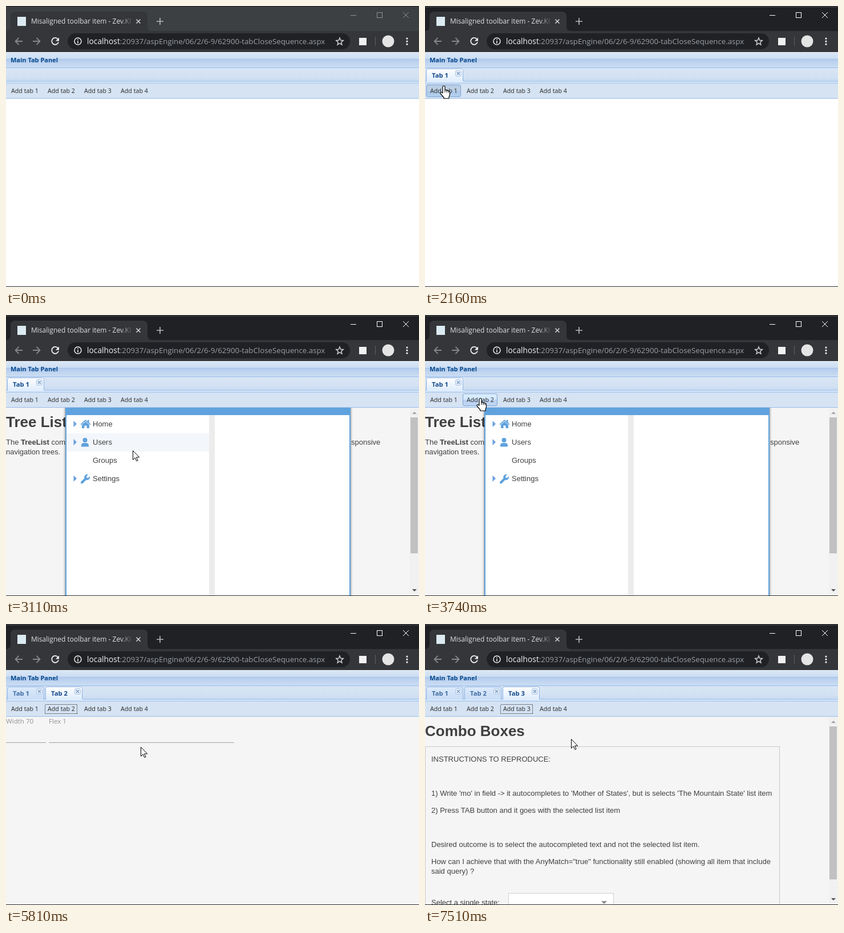
An HTML page for the animation above (8 s loop, 724x494 px).

```html
<!DOCTYPE html>
<html lang="en">
<head>
<meta charset="utf-8">
<title>Tab panel</title>
<style>
  html, body { margin: 0; width: 100%; height: 100%; overflow: hidden; background: #fff; }
  #stage { display: block; width: 724px; height: 494px; }
  rect { shape-rendering: crispEdges; }
  .smooth { shape-rendering: auto; }
  .line { fill: none; stroke-width: 1; }
  .chrome { font-family: "Open Sans", sans-serif; }
  .ui { font: 10.65px "Noto Sans", sans-serif; fill: #333; }
  .bold { font: bold 11px "Noto Sans", sans-serif; }
  .page { font: 13px "Liberation Sans", sans-serif; fill: #404040; }
  .h1 { font-size: 26px; font-weight: bold; }
  .field { font: 11.6px "Open Sans", sans-serif; fill: #929292; }
</style>
</head>
<body>
<svg id="stage" viewBox="0 0 724 494">
  <defs>
    <linearGradient id="header" x2="0" y2="1">
      <stop stop-color="#dae7f6"/><stop offset=".42" stop-color="#cddef3"/>
      <stop offset=".46" stop-color="#abc7ec"/><stop offset=".54" stop-color="#b8cfee"/>
      <stop offset="1" stop-color="#cbddf3"/>
    </linearGradient>
    <linearGradient id="bar" x2="0" y2="1"><stop stop-color="#d8e5f4"/><stop offset=".7" stop-color="#d2e1f3"/><stop offset="1" stop-color="#c5d8ef"/></linearGradient>
    <linearGradient id="hover" x2="0" y2="1">
      <stop stop-color="#dbeeff"/><stop offset=".48" stop-color="#d0e7ff"/>
      <stop offset=".52" stop-color="#bbd2f0"/><stop offset="1" stop-color="#bed6f5"/>
    </linearGradient>
    <linearGradient id="pressed" x2="0" y2="1"><stop stop-color="#b6cbe4"/><stop offset=".48" stop-color="#bfd2e6"/><stop offset=".52" stop-color="#acc9ea"/><stop offset="1" stop-color="#b2cfef"/></linearGradient>
    <linearGradient id="tabOn" x2="0" y2="1"><stop stop-color="#fff"/><stop offset=".35" stop-color="#f3f8fe"/><stop offset="1" stop-color="#deecfd"/></linearGradient>
    <linearGradient id="tabOff" x2="0" y2="1"><stop stop-color="#dceafa"/><stop offset="1" stop-color="#c9ddf6"/></linearGradient>
    <linearGradient id="fade"><stop stop-color="#35363a" stop-opacity="0"/><stop offset="1" stop-color="#35363a"/></linearGradient>
    <filter id="shadow" x="-5%" width="110%"><feDropShadow dx="0" dy="0" stdDeviation="2" flood-opacity=".55"/></filter>
  </defs>

  <!-- browser window -->
  <g class="chrome">
    <rect id="strip" width="724" height="45"/>
    <rect width="724" height="1" fill="#161617"/>
    <rect id="topEdge" y="1" width="724" height="1"/>
    <path d="M0 44q8 0 8-8V18q0-8 8-8H240q8 0 8 8V36q0 8 8 8z" fill="#35363a"/>
    <rect y="44" width="724" height="37" fill="#35363a"/>
    <rect x="20" y="19" width="15" height="16" fill="#dcebf2"/>
    <svg x="44" width="175" height="44"><text y="31" font-size="12" fill="#dfe0e2">Misaligned toolbar item - Zev.KIT</text></svg>
    <rect x="200" y="14" width="24" height="26" fill="url(#fade)"/>
    <path d="M228.5 23.500l7 7m0-7l-7 7" stroke="#d5d6d8" stroke-width="1.5"/>
    <path d="M264 27h12M270 21v12" stroke="#b4b6b9" stroke-width="1.7"/>
    <g id="winButtons" class="line"><path d="M604 16.500h10M696 11l10 10m0-10l-10 10"/><rect x="650.500" y="11.500" width="9" height="9"/></g>
    <g fill="none" stroke="#85878a" stroke-width="1.8">
      <path d="M29 62H16.500m6-6l-6 6 6 6M47 62h12.500m-6-6l6 6-6 6"/>
      <path d="M91 58.200A6 6 0 1 0 92 63.500" stroke="#f1f1f1"/>
    </g>
    <path d="M93 55.500v6h-6z" fill="#f1f1f1"/>
    <rect class="smooth" x="108" y="48" width="495" height="28" rx="14" fill="#202124"/>
    <circle cx="126" cy="62" r="6" fill="none" stroke="#eee" stroke-width="1.5"/>
    <path d="M126 58.200v1.600m0 1.500v4.500" stroke="#eee" stroke-width="1.600"/>
    <text x="142" y="67" font-size="13.800" fill="#f2f2f3">localhost<tspan font-size="13.260" fill="#9aa0a6">:20937/aspEngine/06/2/6-9/62900-tabCloseSequence.aspx</tspan></text>
    <path d="M585 56l1.700 4.300 4.600.3-3.500 3 1.100 4.500-3.900-2.500-3.900 2.500 1.100-4.500-3.500-3 4.600-.3z" fill="none" stroke="#d0d2d5" stroke-width="1.400"/>
    <rect x="619" y="56" width="13" height="13" fill="#f1f1f1"/>
    <rect x="647" y="54" width="1" height="16" fill="#5f6063"/>
    <circle cx="670" cy="62" r="10.500" fill="#e4e4e4"/>
    <path d="M703 57.200h.01M703 62.200h.01M703 67.200h.01" stroke="#eee" stroke-width="3.200" stroke-linecap="round"/>
  </g>

  <!-- panel header, tab bar, toolbar -->
  <rect y="81" width="724" height="27" fill="url(#header)"/>
  <rect y="81" width="724" height="1" fill="#f0f5fb"/>
  <text class="bold" x="8" y="99" fill="#04468c">Main Tab Panel</text>
  <rect y="108" width="724" height="25" fill="url(#bar)"/>
  <rect y="108" width="724" height="1" fill="#99bce8"/>
  <rect y="132" width="724" height="4" fill="#99bce8"/>
  <rect y="133" width="724" height="2" fill="#deecfd"/>
  <rect y="136" width="724" height="26" fill="#d5e3f3"/>
  <rect y="162" width="724" height="1" fill="#99bce8"/>
  <g id="tabs"></g>
  <g id="buttons"></g>

  <!-- page bodies -->
  <svg y="163" width="724" height="330" viewBox="0 163 724 330">
    <g class="body page">
      <rect y="163" width="724" height="330" fill="#f5f5f5"/>
      <text class="h1" y="197">Tree List</text>
      <text y="228">The <tspan font-weight="bold">TreeList</tspan> component</text>
      <text x="605" y="228">sponsive</text><text y="245">navigation trees.</text>
      <rect x="104" y="150" width="500" height="380" fill="#5fa2dd" filter="url(#shadow)"/>
      <rect x="106" y="176" width="496" height="330" fill="#fff"/>
      <rect x="356" y="176" width="10" height="330" fill="#ececec"/>
      <rect id="rowHover" x="106" width="250" height="32" fill="#f3f6fa"/>
      <g id="rows"></g>
      <g fill="#5fa2dd">
        <path d="M130.500 192l9-8 3.500 3v-2.500h2.500v4.700l3 2.800-1.200 1.300-7.800-7-7.800 7zM133 193l6.500-5.700 6.500 5.700v6h-4.500v-4.500h-4v4.500H133z"/>
        <circle cx="138.500" cy="220" r="4"/><path d="M132 231.500v-2q0-4.500 4.500-4.500h4q4.500 0 4.500 4.500v2z"/>
        <path d="M131.500 293l6-6q-1-4 2-6 2.500-1.600 4.500-.5l-3 3 .5 2.500 2.500.5 3-3q1 3-1 5-2.500 2.500-5.500 1.500l-6 6q-1.500 1-3 0-1.200-1.500 0-3z"/>
      </g>
    </g>
    <g class="body field">
      <rect y="163" width="724" height="330" fill="#f5f5f5"/>
      <text y="175">Width 70</text><text x="75" y="175">Flex 1</text>
      <rect y="208" width="70" height="1" fill="#a0a0a0"/><rect x="75" y="208" width="325" height="1" fill="#a0a0a0"/>
    </g>
    <g class="body page">
      <rect y="163" width="724" height="330" fill="#f5f5f5"/>
      <text class="h1" y="197">Combo Boxes</text>
      <rect class="line" x=".5" y="215.500" width="621" height="300" stroke="#c8c8c8"/>
      <g id="instructions"></g>
      <rect x="146.500" y="473.500" width="184" height="30" fill="#fff" stroke="#cfcfcf"/>
      <path d="M309 487h10l-5 5.500z" fill="#919191"/>
    </g>
    <g id="scrollbar">
      <rect x="708" y="163" width="16" height="330" fill="#f1f1f1"/>
      <rect id="thumb" x="709" y="180" width="13" fill="#c1c1c1"/>
      <path d="M712 174h8l-4-4z" fill="#a3a3a3"/><path d="M712 482h8l-4 4z" fill="#505050"/>
    </g>
    <g id="mask">
      <rect y="163" width="724" height="330" fill="#e4e4e4"/>
      <rect x="321.500" y="312.500" width="80" height="30" fill="#dfe9f6" stroke="#99bce8"/>
      <rect x="324.500" y="315.500" width="74" height="24" fill="#eee" stroke="#99bce8"/>
      <g id="spinner"></g>
      <text class="ui" x="350" y="332" style="font-size:10.200px;fill:#222">Loading</text>
    </g>
  </svg>
  <rect y="493" width="724" height="1" fill="#2b2c30"/>

  <g id="pointer" stroke="#000" fill="#fff" stroke-linejoin="round">
    <path id="arrow" d="M.5.500v16l3.700-3.500 2.600 5.700 2.300-1-2.600-5.600h5.200z"/>
    <g id="hand" transform="translate(-6 -1)">
      <path stroke-width="1.200" d="M5 13V2.500a2 2 0 0 1 4 0V8a2 2 0 0 1 3.200.7 2 2 0 0 1 3 .8 1.900 1.900 0 0 1 2.300 1.900V15c0 2.200-1.500 3.500-1.500 5.500v2H7V21l-5.800-7c-1-1.600.6-3.200 2.200-2.100z"/>
      <path fill="none" d="M9 8v4M12.200 9v3M15.200 10v2.500"/>
    </g>
  </g>
</svg>
<script>
const LOOP = 8000;
const $ = id => document.getElementById(id);
const repeat = (n, make) => Array.from({ length: n }, (_, i) => make(i)).join('');
const show = (el, on) => el.setAttribute('display', on ? 'inline' : 'none');
const set = (el, attrs) => { for (const k in attrs) el.setAttribute(k, attrs[k]); };

// Each click: button goes down, tab appears, mask covers it, content is ready.
const openings = [
  { press: 2030, release: 2590, tab: 2110, mask: 2200, load: 2480 },
  { press: 4380, release: 4510, tab: 4510, mask: 4650, load: 4960 },
  { press: 6830, release: 6910, tab: 6910, mask: 7030, load: 7350 }
];

// Pointer moves: start, end, destination.
const start = [696, 490];
const moves = [
  [270, 1050, 96, 212], [1290, 1570, 33, 142], [2000, 2030, 32, 141],
  [2560, 2790, 195, 240], [2800, 2880, 240, 257], [3080, 3500, 112, 124],
  [3500, 3740, 96, 147], [4380, 4510, 96, 150], [4820, 5080, 253, 231],
  [5780, 6100, 160, 148], [7270, 7510, 256, 202]
];

$('buttons').innerHTML = repeat(4, i => `<g transform="translate(${2 + 64 * i} 138)">
  <rect class="smooth face" x=".5" y=".5" width="60" height="21" rx="2.500" stroke="#81a4d0"/>
  <rect class="line focus" x="2.500" y="3.500" width="56" height="16" stroke="#222" stroke-dasharray="1 1"/>
  <text class="ui" x="7" y="15">Add tab ${i + 1}</text></g>`);

$('tabs').innerHTML = repeat(3, i => `<g transform="translate(${2 + 67 * i} 110)">
  <path class="shape" d="M.5 23V3.500q0-3 3-3h58q3 0 3 3V23" stroke="#8db2e3"/>
  <rect class="foot" x="1" y="22" width="64" height="1" fill="#deecfd"/>
  <text class="bold" x="10" y="16" style="font-size:11.300px">Tab ${i + 1}</text>
  <rect class="smooth" x="51.500" y="3.500" width="10" height="10" rx="2" fill="#e4eefa" stroke="#a9c3e3"/>
  <path d="M54 6l5 5m0-5l-5 5" stroke="#7f9fc6" stroke-width="1.500"/></g>`);

$('rows').innerHTML = ['Home', 'Users', 'Groups', 'Settings'].map((label, i) => {
  const y = 196 + 32 * i;
  const expander = label === 'Groups' ? '' : `<path d="M118.500 ${y - 10}l5.500 5.500-5.500 5.500z" fill="#6b9fe0"/>`;
  return `${expander}<text x="152" y="${y}">${label}</text>`;
}).join('');

$('instructions').innerHTML = [
  [242, 'INSTRUCTIONS TO REPRODUCE:'],
  [302, "1) Write 'mo' in field -&gt; it autocompletes to 'Mother of States', but is selects 'The Mountain State' list item"],
  [332, '2) Press TAB button and it goes with the selected list item'],
  [392, 'Desired outcome is to select the autocompleted text and not the selected list item.'],
  [422, 'How can I achieve that with the AnyMatch="true" functionality still enabled (showing all item that include'],
  [439, 'said query) ?'],
  [494, 'Select a single state:']
].map(([y, line]) => `<text x="11" y="${y}">${line}</text>`).join('');

$('spinner').innerHTML = repeat(8, i => {
  const a = i * Math.PI / 4;
  return `<circle cx="${338 + 6 * Math.cos(a)}" cy="${328 + 6 * Math.sin(a)}" r="2" fill="#555"/>`;
});

const buttons = [...$('buttons').children];
const tabs = [...$('tabs').children];
const bodies = [...document.querySelectorAll('.body')];
const dots = [...$('spinner').children];

function pointerAt(t) {
  let [x, y] = start;
  for (const [from, to, toX, toY] of moves) {
    if (t < from) break;
    const p = Math.min(1, (t - from) / (to - from));
    const eased = 1 - (1 - p) ** 2;
    x += (toX - x) * eased;
    y += (toY - y) * eased;
  }
  return [Math.round(x), Math.round(y)];
}

function draw(t) {
  const focused = t >= openings[0].press;
  $('strip').setAttribute('fill', focused ? '#202124' : '#3c4043');
  $('topEdge').setAttribute('fill', focused ? '#505154' : '#3c4043');
  $('winButtons').setAttribute('stroke', focused ? '#fff' : '#909295');

  const [x, y] = pointerAt(t);
  const hovered = y >= 138 && y < 160 ? buttons.findIndex((_, i) => x >= 2 + 64 * i && x < 63 + 64 * i) : -1;
  const clicked = openings.filter(o => t >= o.press).length - 1;
  const active = openings.filter(o => t >= o.tab).length - 1;
  const current = openings[active];

  buttons.forEach((b, i) => {
    const o = openings[i];
    const down = o && t >= o.press && t < o.release;
    show(b.querySelector('.face'), down || hovered === i);
    b.querySelector('.face').setAttribute('fill', down ? 'url(#pressed)' : 'url(#hover)');
    show(b.querySelector('.focus'), i > 0 && clicked === i && !down);
  });

  tabs.forEach((tab, i) => {
    show(tab, i <= active);
    tab.querySelector('.shape').setAttribute('fill', i === active ? 'url(#tabOn)' : 'url(#tabOff)');
    tab.querySelector('text').setAttribute('fill', i === active ? '#15498b' : '#416da3');
    show(tab.querySelector('.foot'), i === active);
  });

  const loaded = current && t >= current.load;
  bodies.forEach((body, i) => show(body, loaded && i === active));
  show($('scrollbar'), loaded && active !== 1);
  $('thumb').setAttribute('height', active === 2 ? 269 : 239);
  show($('mask'), current && t >= current.mask && !loaded);
  dots.forEach((dot, i) => dot.setAttribute('opacity', 0.25 + 0.65 * ((i - Math.floor(t / 90) + 800) % 8) / 7));

  show($('rowHover'), x >= 106 && x < 356 && y >= 176 && y < 304);
  $('rowHover').setAttribute('y', 176 + 32 * Math.floor((y - 176) / 32));

  show($('pointer'), t >= 300);
  set($('pointer'), { transform: `translate(${x} ${y})` });
  show($('hand'), hovered >= 0);
  show($('arrow'), hovered < 0);
}

const begin = performance.now();
function tick() {
  draw((performance.now() - begin) % LOOP);
  requestAnimationFrame(tick);
}
tick();
</script>
</body>
</html>
```
